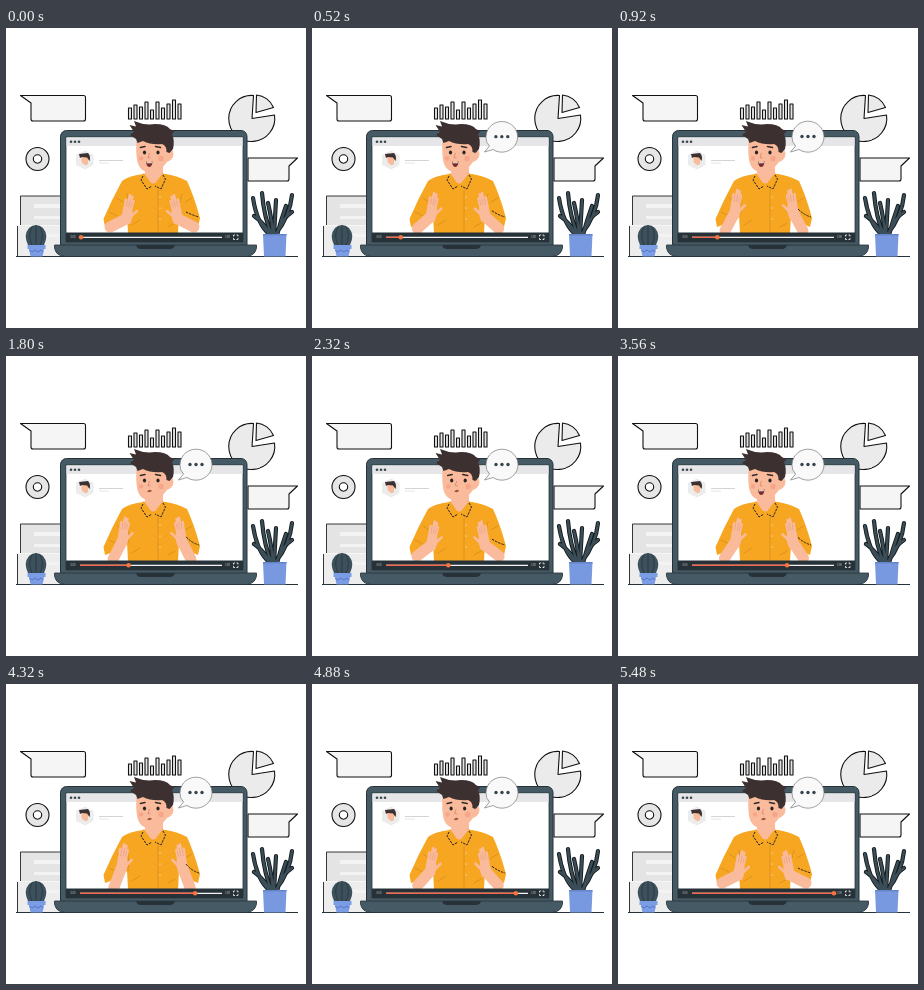
These frames come from a looping animation (300x300 px, 5.52 s). An HTML page:

```html
<!DOCTYPE html>
<html lang="en">
<head>
<meta charset="utf-8">
<style>
html, body { margin: 0; width: 100%; height: 100%; overflow: hidden; background: #fff; }
svg { display: block; width: 100vw; height: 100vh; }
text { font: 2.6px Roboto, sans-serif; fill: #b8c2c7; }
.ink { stroke: #111; stroke-width: 1.1; stroke-linejoin: round; }
.skin { fill: #f9bb9b; }
.hair { fill: #3c3130; }
.shirt { fill: #f6a621; }
.limb { fill: none; stroke: #f9bb9b; stroke-linecap: round; stroke-linejoin: round; }
.fold { fill: none; stroke: #d18a1c; stroke-width: .7; stroke-linecap: round; }
.seam { fill: none; stroke: #2a2424; stroke-width: 1; stroke-dasharray: 2.5 1; }
</style>
</head>
<body>
<svg viewBox="0 0 300 300">
  <!-- floating cards and charts -->
  <g class="ink" fill="#f5f5f5">
    <path d="M14.500 67.500H77.500Q79.500 67.500 79.500 69.500V91Q79.500 93 77.500 93H27Q25 93 25 91V75Z"/>
    <path d="M291.500 130H242V153H281Q283 153 283 151V138Z"/>
    <g id="bars" fill="#e4e4e4"></g>
    <path fill="#ebebeb" d="M247.500 67.500A23 23 0 1 0 268.500 87L246 90.500Z"/>
    <path fill="#ebebeb" d="M250.500 67A20 20 0 0 1 267.500 79.500L250 84.500Z"/>
    <path fill="#e6e6e6" fill-rule="evenodd" d="M20 131a11.500 11.500 0 1 0 23 0a11.500 11.500 0 1 0-23 0M27.300 131a4.200 4.200 0 1 0 8.400 0a4.200 4.200 0 1 0-8.400 0"/>
  </g>

  <!-- books -->
  <path fill="#e4e4e4" d="M14 168H55V197H14Z"/>
  <path fill="#ededed" d="M11 197.500H55V228H11Z"/>
  <path fill="#f3f3f3" d="M28 176H55V180H28ZM28 188H55V191H28ZM20 206H55V209H20Z"/>
  <path fill="none" stroke="#222" stroke-width=".9" d="M55 168H14.500V197M11.500 198V228"/>
  <path stroke="#263238" d="M10 228.500H292"/>

  <!-- cactus -->
  <path fill="#3d515c" d="M22 217Q17 207 23 200Q30 194 37 200Q43 207 38 217Z"/>
  <path fill="none" stroke="#263238" stroke-width=".7" d="M30 197V217M26.500 198Q21 207 26 217M33.500 198Q39 207 34 217"/>
  <path fill="#7b9de6" d="M21.500 217H39.500V221H38L36.500 228.500H24.500L23 221H21.500Z"/>
  <path fill="none" stroke="#4a67b0" stroke-width=".7" d="M23 222L26 224L29 222L32 224L35 222L37.500 224"/>

  <!-- leafy plant -->
  <g id="leaves" fill="none" stroke-linecap="round"></g>
  <path fill="#7899df" d="M257 206H280.500L279.500 228.500H258Z"/>
  <path fill="#6485cc" d="M257 206H280.500V207.500H257Z"/>

  <!-- laptop -->
  <rect x="54.500" y="102.500" width="186.500" height="120" rx="6" fill="#455a64" stroke="#263238"/>
  <rect x="60" y="109" width="177" height="105" fill="#fff" stroke="#263238" stroke-width=".8"/>
  <path fill="#e6e5e8" d="M60.500 109.500H236.500V118H60.500Z"/>
  <g fill="#37474f"><circle cx="65" cy="113.700" r="1.300"/><circle cx="69" cy="113.700" r="1.300"/><circle cx="73" cy="113.700" r="1.300"/></g>

  <!-- profile badge -->
  <path fill="#ececec" d="M79 122.500L87.500 127V137L79 141.500L70 137V127Z"/>
  <path class="skin" d="M75.500 129H82.500L82 136Q79 139 75.500 134Z"/>
  <path class="hair" d="M73 126L82 125Q85 128 83.500 133L81 129.500L76 129L74 130Z"/>
  <path stroke="#c9c9c9" stroke-width=".8" d="M93 132.500H117"/>
  <path stroke="#dedede" stroke-width=".8" d="M93 135H103"/>

  <!-- presenter -->
  <path class="shirt" d="M137 146Q122 148 116 153Q106 171 97.500 191L99 199L113 194L121 187L122 205H172L173 187L180 194L192 199L194 190Q188 168 181 153Q172 148 160 146Z"/>
  <path class="fold" d="M122 187Q124 176 121 166M173 187Q172 176 176 166M152 162V205M126 197L134 192M162 199L169 195M111 170L117 174M186 170L179 174M103 184L111 188"/>
  <g fill="#fff"><circle cx="154" cy="169" r=".6"/><circle cx="154" cy="180" r=".6"/><circle cx="154" cy="191" r=".6"/></g>
  <path class="skin" d="M139 137V149Q147 162 157 149V137Z"/>
  <path class="shirt" d="M138 145L134 149L141 161L147 158ZM157 145L161 149L156 161L147 158Z"/>
  <path class="seam" d="M137 148L135 152L141 161L146 158M157 147L159.500 151L155 161L149 158"/>
  <path class="skin" d="M130.500 113Q129.500 128 132 136Q136 145 145 144.500Q154 144 161 134Q167 132 167.500 126Q167 120 162.500 121L160 110Z"/>
  <path class="hair" d="M124 107L128 104L123.500 97L130 98.500L128 93Q138 97.500 149 96Q160 96 164 101L168.500 103.500L166 106Q169 113 167 121L163.500 125L160.500 124Q161 118 156 116Q145 117 137 113L131.500 115L130 111Z"/>
  <g id="face">
    <g fill="#2a2424"><ellipse cx="138.500" cy="124.500" rx="1.600" ry="1.900"/><ellipse cx="152" cy="124.500" rx="1.600" ry="1.900"/></g>
    <path fill="none" stroke="#302a2c" stroke-width="1.500" stroke-linecap="round" d="M134.500 119.500L139 118.500M149.500 118.500L154.500 119.500"/>
    <path fill="none" stroke="#dd8a6c" stroke-width=".9" d="M143.500 125L142 129.500L144.500 130"/>
    <g fill="#f79880" opacity=".6"><circle cx="135" cy="130.500" r="2.300"/><circle cx="155" cy="130.500" r="2.700"/></g>
    <g id="smile"><path fill="#742e30" d="M140 133.500Q143 134.500 146.500 133.500Q146 139 143 139Q140.500 138.500 140 133.500Z"/><path fill="#fff" d="M140.500 134Q143 134.700 146 134L145.500 135.300H141Z"/></g>
    <path id="rest" fill="#a4513f" d="M141 135.500Q143.500 132.500 146 135Q144 137 141 135.500Z"/>
  </g>
  <g id="arms"></g>

  <!-- player -->
  <path fill="#263238" d="M60 204.500H237V214H60Z"/>
  <text x="64.500" y="210.300">0:00</text>
  <path stroke="#f2f2f2" stroke-width="1.200" d="M74 209.300H216"/>
  <path id="played" stroke="#f0694f" stroke-width="1.400"/>
  <circle id="knob" cy="209.300" r="2.300" fill="#f8743f"/>
  <text x="219" y="210.300">3:00</text>
  <path fill="none" stroke="#fff" stroke-width=".8" d="M227.500 208.500V207H229M230.500 207H232V208.500M232 210V211.500H230.500M229 211.500H227.500V210"/>
  <path fill="#455a64" stroke="#263238" stroke-width=".8" d="M48.500 217H250.500V220Q249 228 240 228.500H59Q50 228 48.500 220Z"/>
  <path fill="#263238" d="M130 217H169Q168 221 164 221H135Q131 221 130 217Z"/>

  <g id="bubble">
    <path fill="#f9f9f9" stroke="#777" stroke-width=".7" d="M172.500 124L177.500 118Q173.500 114 174 108.500A16 15.500 0 1 1 181 121.500Z"/>
    <g fill="#37434a"><circle cx="184" cy="108.500" r="1.700"/><circle cx="190" cy="108.500" r="1.700"/><circle cx="196" cy="108.500" r="1.700"/></g>
  </g>
</svg>
<script>
const LOOP = 5520, GESTURE = LOOP / 2;
const get = id => document.getElementById(id);
const clamp = x => Math.max(0, Math.min(1, x));
const mix = (a, b, k) => a + (b - a) * k;

get('bars').innerHTML = [80, 77, 79, 74, 82, 74, 80, 76, 72, 76].map((top, i) =>
  `<rect x="${122.5 + i * 5.5}" y="${top}" width="3" height="${91 - top}"/>`).join('');

// Each leaf rises from the pot to a tip, bending through a control point.
const leaves = [
  [247, 170, 251, 196], [248, 188, 257, 194], [256, 165, 258, 190],
  [262, 175, 266, 192], [270, 172, 269, 190], [286, 167, 284, 188],
  [286, 184, 276, 190], [280, 178, 275, 192]
].map(([x, y, cx, cy], i) => `M${264 + i} 207Q${cx} ${cy} ${x} ${y}`).join('');
get('leaves').innerHTML =
  `<path stroke="#151b1e" stroke-width="4.200" d="${leaves}"/>
   <path stroke="#3b4e58" stroke-width="2.400" d="${leaves}"/>`;

// A forearm and hand, drawn for the left side and mirrored by side = -1.
function arm(x, side, open) {
  const wristX = mix(20, 15, open), wristY = mix(191, 184, open);
  return `<g transform="translate(${x} 0) scale(${side} 1)">
    <path class="limb" stroke-width="11" d="M${mix(4, 8, open)} ${mix(199, 204, open)}L${wristX} ${wristY}"/>
    <g transform="translate(${wristX} ${wristY}) rotate(${mix(12, 9, open)})">
      <path class="skin" d="M-5 3L-5 -11Q0 -14 4 -11L6 -5L5 4Z"/>
      <path class="limb" stroke-width="2.600" d="M-3.500 -9L-4 -19M-1.300 -9L-1 -24M1 -9L1.500 -23M3 -9L3.500 -19M4 -3L9 -10"/>
      <path fill="none" stroke="#e39a7b" stroke-width=".5" d="M-2.300 -12L-2.500 -18M0 -12L.3 -20M2.200 -12L2.600 -18"/>
    </g>
  </g>`;
}

function draw(t) {
  const beat = t % GESTURE;
  const open = (1 - Math.cos(beat / GESTURE * 2 * Math.PI)) / 2;
  get('arms').innerHTML = arm(100, 1, open) + arm(192, -1, open) +
    `<path class="seam" d="M180 ${mix(184, 180, open)}Q186 187 193 189"/>`;

  const speaking = beat < 1300;
  get('smile').style.display = speaking ? '' : 'none';
  get('rest').style.display = speaking ? 'none' : '';
  const turn = clamp((beat - 1900) / 700) * (1 - clamp((beat - 2720) / 40));
  get('face').setAttribute('transform', `translate(${turn * 2} 0)`);

  const x = Math.min(216, 75 + t * .0264);
  get('knob').setAttribute('cx', x);
  get('played').setAttribute('d', `M74 209.3H${x}`);

  const pop = clamp((t - 240) / 360);
  const scale = 1 - (1 - pop) ** 3;
  get('bubble').setAttribute('transform', `translate(173 124) scale(${scale}) translate(-173 -124)`);
}

const start = performance.now();
function tick() {
  draw((performance.now() - start) % LOOP);
  requestAnimationFrame(tick);
}
tick();
</script>
</body>
</html>
```
